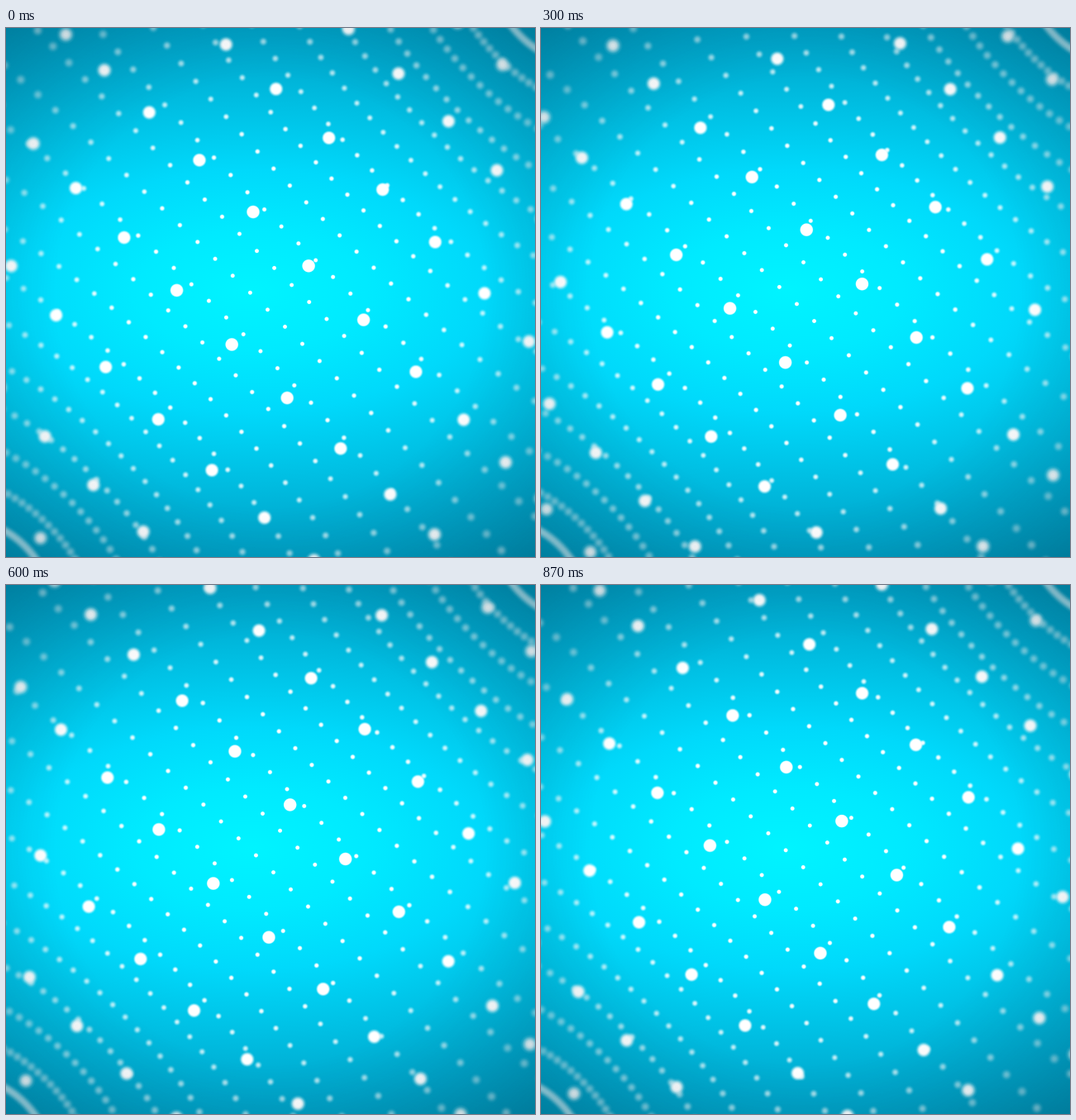
Animation, 640 px wide and 640 px high, one loop 0.9 s. Source, as an HTML page with a canvas:

```html
<!DOCTYPE html>
<html lang="en">
<head>
<meta charset="utf-8">
<title>Dotted sphere</title>
<style>
  html, body { margin: 0; width: 100%; height: 100%; overflow: hidden; }
  canvas {
    display: block;
    background: radial-gradient(700px 366px at 298px 318px,
      #00f4ff 0%, #00eaff 20%, #00d9fb 40%, #00c0e4 61%, #00a6cb 82%, #0091b4 100%);
  }
</style>
</head>
<body>
<canvas width="640" height="640"></canvas>
<script>
const ctx = document.querySelector('canvas').getContext('2d');
const LOOP = 900, STEP = 30;
const RINGS = 23, PER_RING = 65;
const CENTER = 320.3, FOCAL = 888, DISTANCE = 1.909; // in sphere radii
const ROLL = Math.PI / 4 - 0.012, TILT = 0.0116;
const PHASE = 0.107, DOT = 7;

const vignette = ctx.createRadialGradient(320, 320, 260, 320, 320, 460);
vignette.addColorStop(0, 'rgba(0,40,60,0)');
vignette.addColorStop(1, 'rgba(0,40,60,0.2)');

// A white disc whose edge softens away from the middle of the stage
function softDot(x, y, r) {
  const blur = 0.4 + 2.6 * Math.min(1, (x * x + y * y) / 380 ** 2);
  const peak = 1 - Math.exp(-r * r / (2 * blur * blur));
  const outer = r + 1.7 * blur;
  const fill = ctx.createRadialGradient(x, y, Math.max(0, r - 1.7 * blur), x, y, outer);
  [1, 0.86, 0.5, 0.14, 0].forEach((a, i) =>
    fill.addColorStop(i / 4, `rgba(255,255,255,${a * peak})`));
  ctx.fillStyle = fill;
  ctx.beginPath();
  ctx.arc(x, y, outer, 0, 2 * Math.PI);
  ctx.fill();
}

function draw(progress) {
  ctx.clearRect(0, 0, 640, 640);
  ctx.save();
  ctx.translate(CENTER, CENTER);
  ctx.rotate(ROLL);
  for (let ring = 1; ring < RINGS; ring++) {
    const lat = (ring / RINGS - 0.5) * Math.PI;
    const up = Math.sin(lat), width = Math.cos(lat);
    for (let i = 0; i < PER_RING; i++) {
      const lon = (i + PHASE + progress) / PER_RING * 2 * Math.PI;
      const front = width * Math.cos(lon);
      const depth = DISTANCE - front - TILT * up;
      const x = FOCAL * width * Math.sin(lon) / depth;
      const y = -FOCAL * (up - TILT * front) / depth;
      if (Math.hypot(x, y) < 470) softDot(x, y, DOT / depth);
    }
  }
  ctx.restore();
  ctx.fillStyle = vignette;
  ctx.fillRect(0, 0, 640, 640);
}

function tick() {
  const time = performance.now() % LOOP;
  draw(Math.floor(time / STEP) * STEP / LOOP);
  requestAnimationFrame(tick);
}
tick();
</script>
</body>
</html>
```
